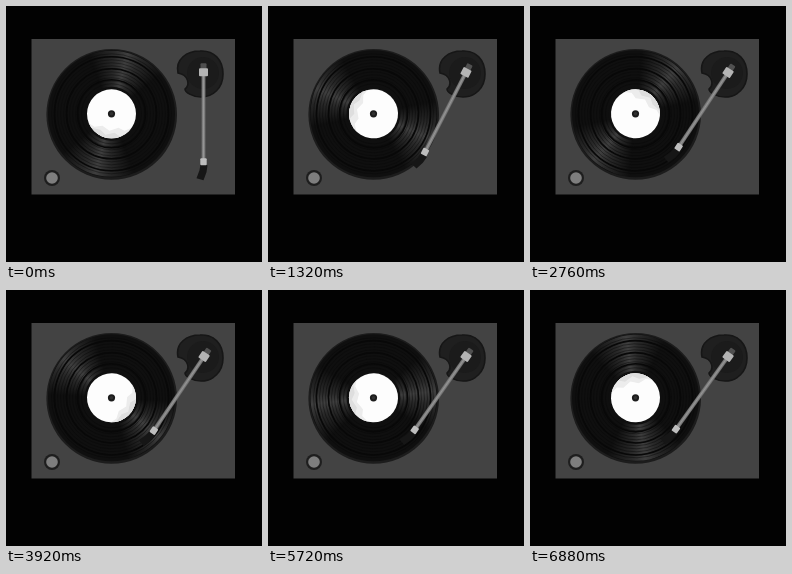
An HTML page that plays this animation: 256 px wide and 256 px high, repeating every 7000 ms.

```html
<!DOCTYPE html>
<html>
<head>
<meta charset="utf-8">
<style>
html, body { margin: 0; height: 100%; overflow: hidden; background: #020202 }
svg { display: block; width: 100vw; height: 100vh }
#sheen {
  width: 126px; height: 126px; border-radius: 50%;
  background: conic-gradient(from 15deg, #fff3, #ffffff1c 12deg, #fff0 36deg 144deg, #ffffff1c 168deg,
    #fff3 180deg, #ffffff1c 192deg, #fff0 216deg 324deg, #ffffff1c 348deg, #fff3);
}
</style>
</head>
<body>
<svg viewBox="0 0 256 256">
  <defs>
    <filter id="soft"><feGaussianBlur stdDeviation=".7"/></filter>
    <clipPath id="labelClip"><circle r="24.5"/></clipPath>
    <linearGradient id="tube">
      <stop stop-color="#666"/><stop offset=".5" stop-color="#959595"/><stop offset="1" stop-color="#666"/>
    </linearGradient>
  </defs>

  <rect x="25.5" y="33" width="203.5" height="155.5" fill="#434343"/>

  <!-- knob -->
  <circle cx="46" cy="172" r="8" fill="#1e1e1e"/>
  <circle cx="46" cy="172" r="5.8" fill="#7e7e7e"/>

  <!-- arm base -->
  <path d="M172 67C169 53 181 45 194 45C208 44 217 54 217 68C217 82 207 91 195 91C186 91 179 86 179 83C184 79 183 69 172 67Z"
    fill="#1f1f1f" stroke="#161616" stroke-width="1.6"/>
  <circle cx="197" cy="67" r="16" fill="#1b1b1b"/>

  <!-- record -->
  <circle cx="105.7" cy="108.4" r="65.3" fill="#1c1c1c" filter="url(#soft)"/>
  <g transform="translate(105.5 107.8)">
    <circle r="63.5" fill="#0f0f0f"/>
    <g id="disc">
      <foreignObject x="-63" y="-63" width="126" height="126"><div id="sheen"></div></foreignObject>
      <g id="grooves" fill="none" stroke="#080808"></g>
      <circle r="27" fill="#0f0f0f"/>
      <circle r="24.5" fill="#fdfdfd"/>
      <g clip-path="url(#labelClip)">
        <path d="M-25 8L-17 13L-9 12L-2 17L7 14L13 17L25 12V26H-25Z" fill="#ececec"/>
        <path d="M-20 14L-11 16L-6 21L3 19L9 23V26H-20Z" fill="#dedede"/>
      </g>
    </g>
    <circle r="3.6" fill="#1c1c1c"/>
    <circle r="1.8" fill="#303030"/>
  </g>

  <!-- tonearm, drawn pointing down from its pivot -->
  <g transform="translate(197.5 67.3)">
    <g id="arm">
      <rect x="-3" y="-10" width="6" height="8" rx="1" fill="#505050"/>
      <path d="M-3 91L4 92L3 99L0 107L-7 105L-4 97Z" fill="#161616"/>
      <rect x="-2" y="0" width="4" height="88" fill="url(#tube)"/>
      <rect x="-4.5" y="-5" width="9" height="8" rx="1" fill="#b4b4b4"/>
      <rect x="-3.2" y="85" width="6.4" height="7" rx="1" fill="#bebebe"/>
    </g>
  </g>
</svg>
<script>
const LOOP = 7000, TURN = 4800, SWING = 1800;
const $ = id => document.getElementById(id);

function ring(r, width) {
  const c = document.createElementNS('http://www.w3.org/2000/svg', 'circle');
  c.setAttribute('r', r);
  c.setAttribute('stroke-width', width);
  $('grooves').append(c);
}
for (let r = 30; r < 63; r += 3) ring(r, .4);
for (const r of [34, 45, 57]) ring(r, 1.6);

const smooth = u => u * u * (3 - 2 * u);

// quick swing onto the record, then a slow drift inward
function armAngle(t) {
  return 33 * smooth(Math.min(t / SWING, 1)) + .00052 * Math.max(t - SWING, 0);
}

function draw(now) {
  const t = now % LOOP;
  $('disc').setAttribute('transform', `rotate(${t / TURN * 360})`);
  $('arm').setAttribute('transform', `rotate(${armAngle(t)})`);
  requestAnimationFrame(draw);
}
draw(0);
</script>
</body>
</html>
```
